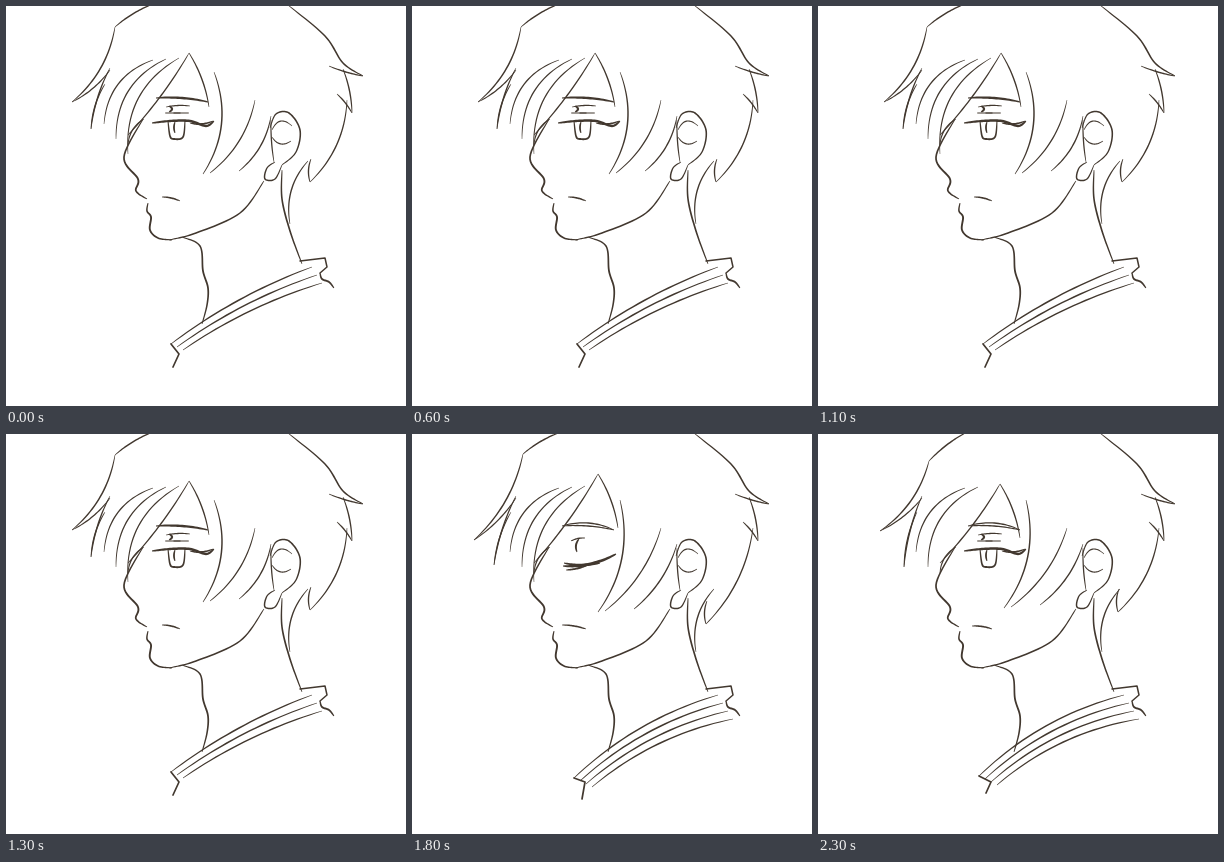
Write an HTML page with a canvas that moves like this. It is 400x400 px and loops after 2.4 s.

```html
<!DOCTYPE html>
<html lang="en">
<head>
<meta charset="utf-8">
<title>Blinking profile sketch</title>
<style>
html, body { margin: 0; width: 100%; height: 100%; overflow: hidden; background: #fff; }
canvas { display: block; width: 400px; height: 400px; }
</style>
</head>
<body>
<canvas id="stage" width="400" height="400"></canvas>
<script>
const ctx = document.getElementById('stage').getContext('2d');
ctx.fillStyle = ctx.strokeStyle = '#42382f';
ctx.lineCap = ctx.lineJoin = 'round';

// Fills a stroke along at(t), t = 0..1, that thins towards both ends
function ink(width, at, steps) {
  const left = [], right = [];
  for (let n = 0; n <= steps; n++) {
    const t = n / steps, [x, y] = at(t);
    const [ax, ay] = at(Math.max(0, t - 0.01)), [bx, by] = at(Math.min(1, t + 0.01));
    const half = width / 2 * (0.35 + 0.65 * Math.sqrt(Math.sin(Math.PI * t)));
    const k = half / (Math.hypot(bx - ax, by - ay) || 1);
    left.push([x - (by - ay) * k, y + (bx - ax) * k]);
    right.unshift([x + (by - ay) * k, y - (bx - ax) * k]);
  }
  ctx.beginPath();
  for (const point of [...left, ...right]) ctx.lineTo(...point);
  ctx.fill();
}

// Bow between two points; a positive bend swells to the right of the way
function arc(width, [x0, y0], [x1, y1], bend = 0) {
  const dx = x1 - x0, dy = y1 - y0, k = 4 * bend / Math.hypot(dx, dy);
  ink(width, t => {
    const swell = k * t * (1 - t);
    return [x0 + dx * t - dy * swell, y0 + dy * t + dx * swell];
  }, 24);
}

// Smooth line through x,y pairs (Catmull-Rom)
function pen(width, ...xy) {
  const last = xy.length / 2 - 1;
  const get = (i, k) => xy[2 * Math.max(0, Math.min(last, i)) + k];
  ink(width, t => {
    const i = Math.min(last - 1, Math.floor(t * last)), u = t * last - i;
    return [0, 1].map(k => {
      const [a, b, c, d] = [-1, 0, 1, 2].map(j => get(i + j, k));
      return b + u * (c - a + u * (2 * a - 5 * b + 4 * c - d + u * (3 * (b - c) + d - a))) / 2;
    });
  }, last * 12);
}

function bent(width, ...points) {
  ctx.lineWidth = width;
  ctx.beginPath();
  for (const point of points) ctx.lineTo(...point);
  ctx.stroke();
}

function hair({ crown, tip, temple, strands, part, lock, nape }) {
  // left outline and temple
  arc(1.5, [crown[0] + 38, -2], crown, 2);
  arc(1.5, crown, tip, -8);
  arc(1.3, tip, [104, 64], 3);
  arc(1.4, [104, 62], temple, 3);
  arc(1.3, temple, [99, 78], -3);
  // fringe
  for (let i = 0; i < strands; i++)
    arc(1.3, [147 + 13 * i, 54 - i], [98 + 12 * i, 118 + 15 * i], 13 + 2 * i);
  arc(1.4, part, [122, 129], -3);
  arc(1.3, [122, 139], [138, 113], -4);
  arc(1.4, part, [part[0] + 20, part[1] + 54], -3);
  // locks beside the ear
  const [x, y] = lock;
  arc(1.5, [208, 66], lock, -13);
  arc(1.3, [249, 94], [x + 7, y - 1], -8);
  arc(1.4, [265, 110], [x + 36, y - 3], -6);
  // back of the head
  pen(1.6, 282, -1, 319, 30, 337, 57, 357, 70);
  arc(1.4, [357, 70], [323, 60], -1);
  arc(1.4, [337, 63], [346, 107], -2);
  arc(1.4, [346, 107], [331, 88], 1);
  arc(1.4, [341, 94], nape, 9 * -1);
  arc(1.4, nape, [nape[0] + 1, nape[1] - 23], -2);
  arc(1.4, [302, 155], [284, 218], 8);
}

function face({ mouth, brows }) {
  pen(1.9, 137, 113, 118, 151, 132, 173, 130, 185, 141, 193);
  pen(1.9, 142, 197, 141, 205, 145, 211, 144, 224, 152, 232, 166, 234);
  pen(1.6, 163, 234, 190, 227, 234, 207, 258, 175);
  arc(1.6, mouth, [174, 195], -1);
  for (let i = 0; i < brows; i++) arc(2 / brows + 0.4, [150, 92], [202, 96], -2 - 3 * i);
}

function openEye() {
  arc(1.3, [160, 101], [184, 100], -1);
  arc(1.3, [159, 107], [183, 107]);
  arc(2.2, [163, 100], [163, 106], -3);
  pen(2.6, 146, 117, 164, 115, 184, 115, 200, 120, 208, 115);
  arc(1.8, [184, 117], [207, 115], 2);
  pen(1.9, 162, 115, 164, 130, 168, 133, 177, 131, 179, 115);
  arc(1.8, [169, 116], [169, 127], 1);
}

function shutEye() {
  arc(1.4, [159, 107], [173, 104], -1);
  arc(2, [167, 105], [165, 118], 2);
  arc(3, [151, 132], [204, 120], 4);
  arc(2.4, [152, 129], [188, 129], 2);
  arc(1.9, [154, 136], [176, 131], 1);
}

function ear() {
  pen(1.6, 264, 122, 270, 108, 283, 107, 294, 124, 290, 146, 276, 159);
  pen(1.5, 276, 159, 269, 173, 259, 173, 261, 162, 269, 156);
  arc(1.3, [265, 114], [268, 156], 1);
  arc(1.2, [266, 124], [286, 120], -7);
  arc(1.2, [266, 131], [285, 135], 5);
}

function body({ knot, foot, folds, slack }) {
  pen(1.8, 176, 231, 194, 240, 197, 265, 202, 282, 201, 299, 196, 318);
  pen(1.7, 276, 164, 276, 193, 284, 225, 296, 258);
  bent(1.5, [294, 255], [319, 252], [321, 261], [314, 267]);
  pen(1.9, 314, 267, 316, 273, 323, 276, 328, 282);
  for (let i = 0; i < folds; i++)
    arc(1.5, [knot[0] + 6 * i, knot[1] + 3 * i], [306 + 5 * i, 261 + 8 * i], slack);
  bent(1.7, knot, [173, 348], foot);
}

const poses = {
  A: {
    crown: [109, 21], tip: [66, 96], temple: [85, 123], strands: 3, part: [183, 47],
    lock: [197, 168], nape: [304, 176], mouth: [156, 191], brows: 1, eye: openEye,
    knot: [165, 338], foot: [167, 361], folds: 3, slack: -6
  },
  B: {
    crown: [111, 27], tip: [62, 97], temple: [86, 133], strands: 2, part: [182, 50],
    lock: [186, 174], nape: [300, 178], mouth: [154, 192], brows: 2, eye: openEye,
    knot: [161, 342], foot: [168, 359], folds: 4, slack: -11
  },
  C: {
    crown: [111, 20], tip: [62, 106], temple: [82, 131], strands: 3, part: [186, 40],
    lock: [186, 178], nape: [294, 190], mouth: [150, 191], brows: 2, eye: shutEye,
    knot: [162, 344], foot: [170, 365], folds: 4, slack: -10
  }
};

// The open poses alternate; each blink slips in between them
const order = 'ABABABAB' + 'C' + 'ABABABABA' + 'C' + 'BABAB';
let shown;

function draw() {
  const name = order[Math.floor(performance.now() % 2400 / 100)];
  if (name !== shown) {
    shown = name;
    ctx.clearRect(0, 0, 400, 400);
    const pose = poses[name];
    hair(pose);
    face(pose);
    pose.eye();
    ear();
    body(pose);
  }
  requestAnimationFrame(draw);
}
draw();
</script>
</body>
</html>
```
